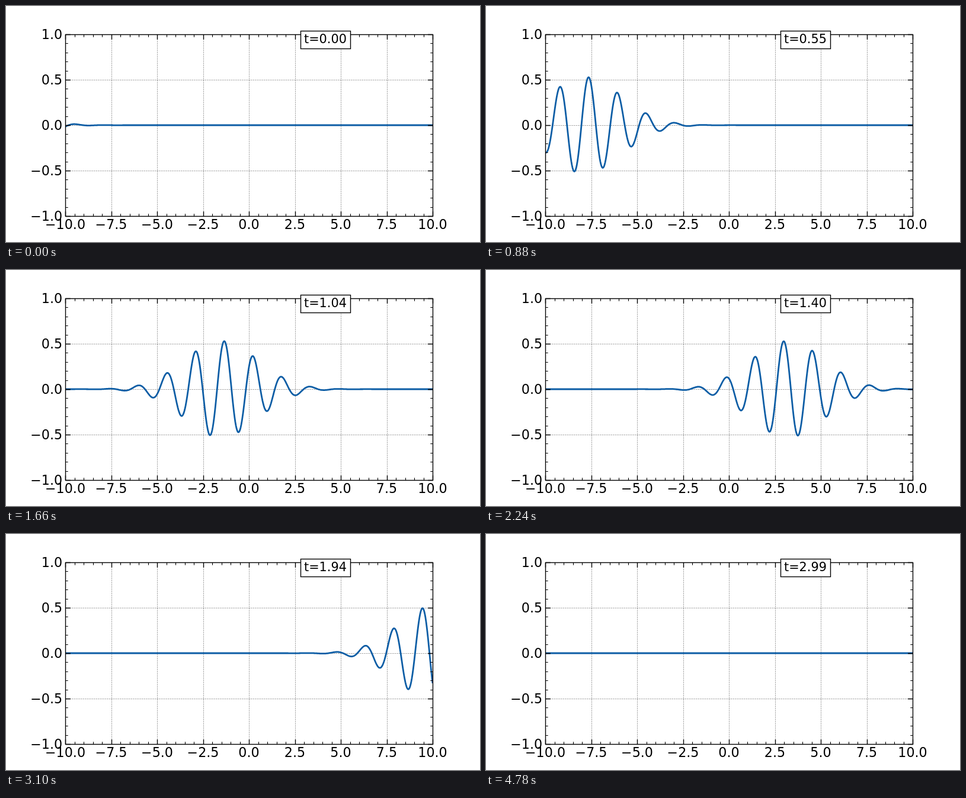
An HTML page that plays this animation: 800x400 px, repeating every 4.8 s.

```html
<!DOCTYPE html>
<html lang="en">
<head>
<meta charset="utf-8">
<title>Travelling wave packet</title>
<style>
  html, body { margin: 0; width: 100%; height: 100%; overflow: hidden; background: #fff; }
  svg { display: block; width: 800px; height: 400px; }
  text { font-family: "DejaVu Sans", sans-serif; font-size: 22.22px; fill: #000; }
  .grid { stroke: #000; stroke-opacity: .5; stroke-width: .69; stroke-dasharray: 2.57 1.11; fill: none; }
  .frame { stroke: #000; stroke-width: 1.39; fill: none; }
  .tick { stroke: #000; stroke-width: 1.39; fill: none; }
  .minor { stroke: #000; stroke-width: 1.11; fill: none; }
  .wave { stroke: #0c5da5; stroke-width: 2.78; stroke-linejoin: round; fill: none; }
  .box { stroke: #000; stroke-width: 1.39; fill: #fff; }
  #clock { font-size: 20.83px; }
</style>
</head>
<body>
<svg viewBox="0 0 800 400" xmlns="http://www.w3.org/2000/svg">
  <clipPath id="plot"><rect x="100" y="48" width="620" height="308"/></clipPath>
  <path class="grid" id="grid"/>
  <g clip-path="url(#plot)"><path class="wave" id="wave"/></g>
  <path class="minor" id="minor"/>
  <path class="tick" id="major"/>
  <rect class="frame" x="100.5" y="48.5" width="620" height="308"/>
  <g id="labels"></g>
  <rect class="box" x="497.5" y="42.5" width="84" height="30"/>
  <text id="clock" x="503" y="63">t=0.00</text>
</svg>
<script>
const LOOP = 4800, STEP = 20, DT = 1 / 80;
const LEFT = 100, RIGHT = 720, TOP = 48, BOTTOM = 356;
const SAMPLES = 620;
const $ = id => document.getElementById(id);
const px = x => 410 + 31 * x;
const py = y => 202 - 154 * y;
const snap = v => Math.floor(v + 0.5 + 1e-6) + 0.5;

function addLabel(value, x, y, anchor) {
  const el = document.createElementNS("http://www.w3.org/2000/svg", "text");
  el.textContent = value.toFixed(1).replace("-", "\u2212");
  el.setAttribute("x", x);
  el.setAttribute("y", y);
  el.setAttribute("text-anchor", anchor);
  $("labels").append(el);
}

// Inward ticks on both opposite sides
const xTicks = (x, len) => `M${x} 356.5v${-len}M${x} 48.5v${len}`;
const yTicks = (y, len) => `M100.5 ${y}h${len}M720.5 ${y}h${-len}`;

function drawAxes() {
  let grid = "", major = "", minor = "";
  for (let i = -20; i <= 20; i++) {
    const x = snap(px(i / 2));
    if (i % 5) { minor += xTicks(x, 4.17); continue; }
    major += xTicks(x, 8.33);
    if (Math.abs(i) < 20) grid += `M${x} ${BOTTOM}V${TOP}`;
    addLabel(i / 2, px(i / 2), 378, "middle");
  }
  for (let i = -10; i <= 10; i++) {
    const y = snap(py(i / 10));
    if (i % 5) { minor += yTicks(y, 4.17); continue; }
    major += yTicks(y, 8.33);
    if (Math.abs(i) < 10) grid += `M${LEFT} ${y}H${RIGHT}`;
    addLabel(i / 10, 95.1, py(i / 10) + 8, "end");
  }
  $("grid").setAttribute("d", grid);
  $("major").setAttribute("d", major);
  $("minor").setAttribute("d", minor);
}

// Normalised Gaussian envelope moving at speed 13 over a slower carrier
const AMP = Math.pow(4 * Math.PI, -0.25);
function psi(x, t) {
  const u = x + 15 - 13 * t;
  return AMP * Math.exp(-u * u / 8) * Math.cos(4 * x - 13 * t);
}

// Two decimals, exact halves go to the even digit
function format(t) {
  return (t % 0.5 === 0.125 ? t - 0.005 : t).toFixed(2);
}

function draw(ms) {
  const t = Math.floor((ms % LOOP) / STEP) * DT;
  let d = "";
  for (let i = 0; i <= SAMPLES; i++) {
    const x = -10 + 20 * i / SAMPLES;
    d += (i ? "L" : "M") + px(x).toFixed(2) + " " + py(psi(x, t)).toFixed(2);
  }
  $("wave").setAttribute("d", d);
  $("clock").textContent = "t=" + format(t);
}

function tick() {
  draw(performance.now());
  requestAnimationFrame(tick);
}

drawAxes();
tick();
</script>
</body>
</html>
```
